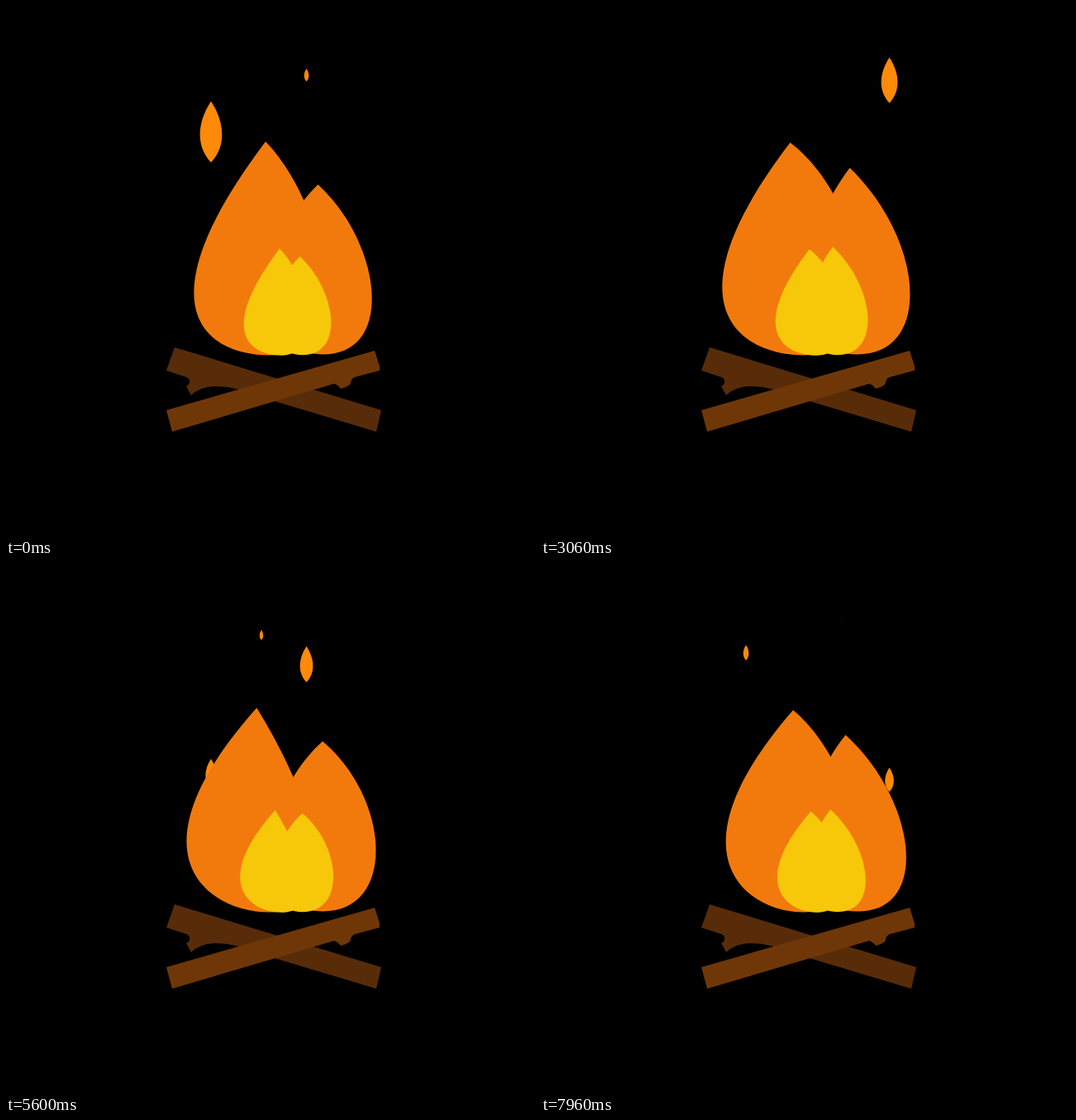
Recreate the animation shown at these times as an HTML page. Size 640x640 px, loop 8 s.

```html
<!DOCTYPE html>
<html lang="en">
<head>
<meta charset="utf-8">
<title>Campfire</title>
<style>
  html, body { margin: 0; width: 100%; height: 100%; overflow: hidden; background: #000; }
  svg { display: block; width: 100vw; height: 100vh; }
</style>
</head>
<body>
<svg viewBox="0 0 640 640">
  <g id="sparks" fill="#fd8a09"></g>
  <g fill="#f27a0d"><path class="left"/><path class="right"/></g>
  <g fill="#f7c709">
    <path class="left" transform="translate(174 211.5) scale(.5)"/>
    <path class="right" transform="translate(136.5 177.7) scale(.58)"/>
  </g>
  <path fill="#582c09" d="M204 413L454 489L448 515L298 470Q277 460 252 460Q234 461 224 471L218 460Q223 458 222 453Q221 449 215 448L194 441Z"/>
  <path fill="#6f3707" d="M194 489L446 417L452 436V441L422 449Q417 451 417 456Q416 460 405 463Q401 458 397 457L201 515Z"/>
</svg>
<script>
const LOOP = 8000, STEP = 112, LEAD = 36;
const SPARK_CYCLE = 6720, EMBER_Y = 385, PEAK = 0.517;

// Key poses: time, left tip, right tip, and how far right the left lobe bulges
const POSES = [
  [0, 314, 164, 377.5, 216, 386],
  [1240, 297, 189, 380, 198, 386],
  [2240, 316, 160.5, 365.5, 198, 397],
  [3800, 299, 170, 369.5, 193.5, 386],
  [4600, 314, 183, 361, 214, 325],
  [6460, 305.5, 169, 390, 217, 382],
  [7960, 305, 178, 368.5, 208, 382]
];

// All sparks share one life curve; rise is the distance climbed to the top
const SPARKS = [
  { x: 248, birth: -2210, life: 4500, size: 78, top: 103, rise: 335 },
  { x: 421.5, birth: 350, life: 4500, size: 78, top: 61, rise: 374 },
  { x: 309, birth: 2010, life: 4500, size: 70, top: 84, rise: 292 },
  { x: 363.5, birth: 2250, life: 6150, size: 49, top: 71.5, rise: 477 }
];

const svg = document.querySelector('svg');
const sparkGroup = document.getElementById('sparks');
for (const spark of SPARKS) {
  spark.node = document.createElementNS(svg.namespaceURI, 'path');
  spark.node.setAttribute('d', 'M0-.5C-.24-.13-.24 .25 0 .5C.24 .25 .24-.13 0-.5Z');
  sparkGroup.append(spark.node);
}

function setPath(selector, d) {
  for (const node of svg.querySelectorAll(selector)) node.setAttribute('d', d);
}

// A lobe runs from its tip down both sides to one rounded base point
function lobe(tip, leftControl, rightControl, [baseX, baseY], leftBase, rightBase) {
  return `M${tip}C${leftControl} ${baseX - leftBase} ${baseY} ${baseX} ${baseY}`
    + `C${baseX + rightBase} ${baseY} ${rightControl} ${tip}Z`;
}

function drawFlame(time) {
  const next = Math.max(1, POSES.findIndex(pose => pose[0] > time));
  const end = time >= POSES.at(-1)[0] ? POSES.length - 1 : next;
  const from = POSES[end - 1], to = POSES[end];
  const p = Math.min((time - from[0]) / (to[0] - from[0]), 1);
  const ease = p * p * (3 - 2 * p);
  const [, leftX, leftY, rightX, rightY, bulge] = from.map((value, i) => value + (to[i] - value) * ease);

  // The flame swells between poses, and a lower left tip widens its belly
  const swell = 12 * Math.sin(Math.PI * p) ** 2;
  const drop = leftY - 174;
  setPath('.left', lobe(
    [leftX - swell / 2, leftY],
    [154 - 0.3 * drop - swell, 358 - 1.4 * drop],
    [bulge, 238 + 0.8 * (386 - bulge)],
    [318, 422.5], 70, 110));
  setPath('.right', lobe(
    [rightX + swell / 2, rightY],
    [308, 282],
    [453 + swell, 285],
    [383, 421.5], 90, 90));
}

function drawSpark({ x, birth, life, size, top, rise, node }, time) {
  const age = (time - birth + SPARK_CYCLE) % SPARK_CYCLE / life;
  const left = Math.max(1 - age, 0);
  const height = size * (age < PEAK ? age / PEAK : (left / (1 - PEAK)) ** 2);
  const y = Math.min(EMBER_Y, top + rise * left ** 2.84);
  node.setAttribute('transform', `translate(${x} ${y}) scale(${height})`);
}

function draw(ms) {
  const time = Math.floor((ms % LOOP + LEAD) / STEP) * STEP;
  drawFlame(time);
  for (const spark of SPARKS) drawSpark(spark, time);
}

const begin = performance.now();
function tick() {
  draw(performance.now() - begin);
  requestAnimationFrame(tick);
}
tick();
</script>
</body>
</html>
```
